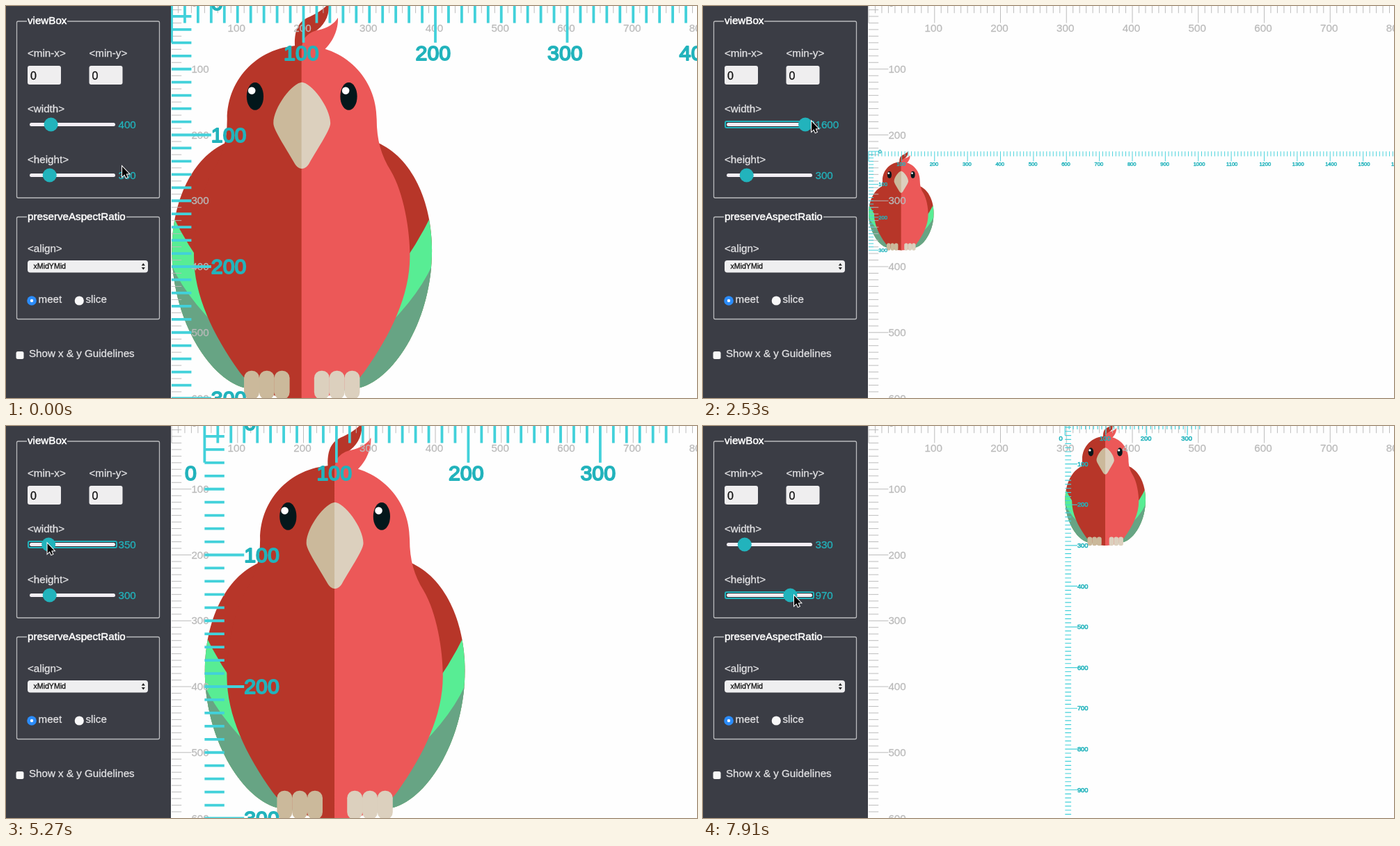
An HTML page with a canvas that plays this animation: 993x564 px, repeating every 8 s.

```html
<!DOCTYPE html>
<html lang="en">
<head>
<meta charset="utf-8">
<title>viewBox playground</title>
<style>
html, body { margin: 0; width: 100%; height: 100%; overflow: hidden; background: #fefefe; }
canvas { display: block; }
</style>
</head>
<body>
<canvas id="stage" width="993" height="564"></canvas>
<script>
const ctx = document.getElementById('stage').getContext('2d');
const LOOP = 8000;
const FONT = '"Liberation Sans", Arial, sans-serif';
const TEAL = '#22b3bc', TICK = '#42d1da', GREY = '#bababa';
const RED = '#b73629', CORAL = '#ec5858', SAND = '#cbb99b', CREAM = '#dcd0be';
const LABEL = '#e2e2e4', PANEL = '#3b3d45';

// Viewport of 800 x 600 units on the page
const UNIT = 0.9475, LEFT = 238, TOP = -4;

// The pointer drags the sliders: each leg leads the pose to new values
const power = p => u => u ** p;
const glide = u => { const v = u ** 1.2; return v * v * (3 - 2 * v); };
const REST = { x: 167, y: 231, width: 400, height: 300 };
const legs = [
  { from: 350, to: 350, x: 153, y: 226 },
  { from: 440, to: 910, x: 66, y: 174 },
  { from: 1360, to: 2530, x: 156, y: 166, width: 1600, ease: power(1.15) },
  { from: 2530, to: 2700, x: 161, y: 159 },
  { from: 3000, to: 4440, x: 70, y: 169, width: 500, ease: glide },
  { from: 4440, to: 5360, x: 58, y: 169, width: 330 },
  { from: 5760, to: 6610, x: 66, y: 243 },
  { from: 6740, to: 6960, x: 76, y: 244, height: 400 },
  { from: 7050, to: 7910, x: 131, y: 244, height: 970, ease: power(1.7) }
];
const STEP = 100;

function poseAt(t) {
  const pose = { ...REST };
  for (const { from, to, ease = power(1), ...goal } of legs) {
    if (t < from) break;
    const held = Math.floor((t - from) / STEP) * STEP;
    const u = t >= to ? 1 : ease(held / (to - from));
    for (const key in goal) pose[key] += (goal[key] - pose[key]) * u;
  }
  return pose;
}

function paint(fill, stroke, line) {
  if (fill) { ctx.fillStyle = fill; ctx.fill(); }
  if (stroke) { ctx.strokeStyle = stroke; ctx.lineWidth = line; ctx.stroke(); }
}
function rect(x, y, w, h, r, fill, stroke, line = 1) {
  ctx.beginPath();
  ctx.roundRect(x, y, w, h, r);
  paint(fill, stroke, line);
}
function oval(x, y, rx, ry, fill) {
  ctx.beginPath();
  ctx.ellipse(x, y, rx, ry, 0, 0, 7);
  paint(fill);
}
function text(s, x, y, color, size = 15.16, weight = 0.3) {
  ctx.font = size + 'px ' + FONT;
  ctx.fillStyle = ctx.strokeStyle = color;
  ctx.lineWidth = weight;
  ctx.lineJoin = 'round';
  ctx.fillText(s, x, y);
  ctx.strokeText(s, x, y);
}
function fillPath(path, fill) {
  ctx.fillStyle = fill;
  ctx.fill(path);
}

// Bird outlines, x measured from its middle line
const halfBody = new Path2D('M-.3 32C32.3 32 56.7 57 56.7 88C56.7 104 60.3 116 67.3 127C77.3 144 81.9 172 81.9 192C81.9 222 67.3 252 47.3 280C36.3 295 19.3 300.5-.3 300.5Z');
const halfBeak = new Path2D('M-.3 60C7 60 21.6 79 21.6 91C21.6 96 13.3 108 5.3 122C3.3 125 1.3 125.6-.3 125.6Z');
const halfWing = new Path2D('M0 90L57.5 106C83 117 98.6 150 98.6 188C98.6 238 72 284 43.8 292L0 300Z');
const backCrest = new Path2D('M-5.2 36C-6.2 22-3.7 15 4.3 11C11.3 8 17.3 4 20.3 0C21.3 9 17.3 17 9.3 22L0 36Z');
const frontCrest = new Path2D('M0 34C.3 26 5.3 22 12.3 20.5C19.3 19 24.3 16 27.3 11C27.8 20 23.3 30 16.3 36Z');
const midFeathers = new Path2D('M101 155Q88 183 71 205H0V310H101Z');
const lowFeathers = new Path2D('M101 194Q88 226 51 258H0V310H101Z');
const arrow = new Path2D('M0 0V14.4L3.3 11.3L5.5 16.2L7.7 15.3L5.5 10.5L9.8 10.3Z');

function bothSides(drawSide) {
  for (const side of [-1, 1]) {
    ctx.save();
    ctx.scale(side, 1);
    drawSide(side < 0);
    ctx.restore();
  }
}

function wing() {
  fillPath(halfWing, RED);
  ctx.clip(halfWing);
  fillPath(midFeathers, '#58ed94');
  fillPath(lowFeathers, '#67a484');
}

function bird() {
  ctx.save();
  ctx.translate(98.8, 0);
  bothSides(wing);
  fillPath(backCrest, RED);
  bothSides(left => fillPath(halfBody, left ? RED : CORAL));
  fillPath(frontCrest, CORAL);
  bothSides(left => {
    fillPath(halfBeak, left ? SAND : CREAM);
    for (let i = 0; i < 3; i++) {
      rect(9.3 + i * 11.5, 279, 11.6, 21.8, 5.5, left ? SAND : CREAM);
    }
    oval(35.5, 70.7, 6.4, 10.5, '#03171b');
    oval(left ? 38 : 33.2, 66.4, 2.8, 2.8, '#fff');
  });
  ctx.restore();
}

function ruler(w, h, tick, label, line, weight) {
  const size = i => i % 100 ? 15 : 30;
  ctx.beginPath();
  for (let i = 0; i <= w; i += 10) {
    ctx.moveTo(i, 0);
    ctx.lineTo(i, size(i));
  }
  for (let i = 0; i <= h; i += 10) {
    ctx.moveTo(0, i);
    ctx.lineTo(size(i), i);
  }
  paint(null, tick, line);
  for (let i = 0; i <= w; i += 100) text(i, i - 15, 43.3, label, 16, weight);
  for (let i = 0; i <= h; i += 100) text(i, 30, i + 5.5, label, 16, weight);
}

function drawing(w, h) {
  const fit = Math.min(800 / w, 600 / h), k = fit * UNIT;
  const x = LEFT + (800 - w * fit) / 2 * UNIT;
  const y = TOP + (600 - h * fit) / 2 * UNIT;
  ctx.setTransform(k, 0, 0, k, x, y);
  bird();
  ctx.setTransform(UNIT, 0, 0, UNIT, LEFT, TOP);
  ruler(800, 600, GREY, GREY, 1, 0.3);
  ctx.setTransform(k, 0, 0, k, x, y);
  ruler(w, h, TICK, TEAL, 2, 1);
  ctx.setTransform(1, 0, 0, 1, 0, 0);
}

function fieldset(title, y, h, titleWidth) {
  rect(15.5, y + 0.5, 205, h, 2, null, '#b9babd', 1.3);
  ctx.fillStyle = PANEL;
  ctx.fillRect(30, y - 2, titleWidth, 5);
  text(title, 31, y + 4.5, '#fff', 15.16, 0.5);
}

function slider(name, y, value, max, focused) {
  text(`<${name}>`, 31, y - 18, LABEL);
  if (focused) rect(32, y - 4.5, 127, 9, 2, '#2f3138', TEAL, 2);
  rect(34, y - 2.5, 123, 5, 2.5, '#f3eef4');
  oval(44 + 103 * (value - 100) / (max - 100), y, 10, 10, TEAL);
  text(value, 161.5, y + 5, TEAL);
}

function numberField(name, x) {
  text(`<${name}>`, x, 73, LABEL);
  rect(x, 86, 48, 27, 3, '#efeeef');
  text('0', x + 4, 106, '#111', 16);
}

function triangle(x, y, rise) {
  ctx.beginPath();
  ctx.moveTo(x - 2.6, y);
  ctx.lineTo(x + 2.6, y);
  ctx.lineTo(x, y - rise);
  paint('#222');
}

function sidebar(w, h, focus) {
  ctx.fillStyle = PANEL;
  ctx.fillRect(0, 0, 237, 564);

  fieldset('viewBox', 21.5, 254, 58);
  numberField('min-x', 31);
  numberField('min-y', 119.5);
  slider('width', 170.5, w, 1600, focus === 'width');
  slider('height', 243.5, h, 1200, focus === 'height');

  fieldset('preserveAspectRatio', 303, 147, 143);
  text('<align>', 31, 354, LABEL);
  rect(31, 366, 173, 17.5, 4, '#efeff0');
  text('xMidYMid', 39.5, 378, '#111', 10.6);
  triangle(197.3, 373.5, 3.4);
  triangle(197.3, 376, -3.4);

  oval(37, 424, 6.8, 6.8, '#2b8cfa');
  oval(37, 424, 2.2, 2.2, '#fff');
  text('meet', 46.5, 427, LABEL);
  oval(105.3, 424, 6.6, 6.6, '#f8f8f8');
  text('slice', 114.5, 427, LABEL);

  rect(14.5, 497, 11, 11, 2.5, '#f8f8f8');
  text('Show x & y Guidelines', 33, 505, LABEL);
}

function cursor(x, y) {
  ctx.save();
  ctx.translate(x, y);
  ctx.strokeStyle = '#fff';
  ctx.lineWidth = 2;
  ctx.lineJoin = 'miter';
  ctx.stroke(arrow);
  fillPath(arrow, '#000');
  ctx.restore();
}

const round10 = v => Math.round(v / 10) * 10;

function draw(t) {
  const { x, y, width, height } = poseAt(t);
  const w = round10(width), h = round10(height);
  const focus = t < 1180 ? '' : t < 6410 ? 'width' : 'height';
  ctx.fillStyle = '#fefefe';
  ctx.fillRect(0, 0, 993, 564);
  drawing(w, h);
  sidebar(w, h, focus);
  cursor(x, y);
}

let start;
function frame(now) {
  start ??= now;
  draw((now - start) % LOOP);
  requestAnimationFrame(frame);
}
draw(0);
requestAnimationFrame(frame);
</script>
</body>
</html>
```
